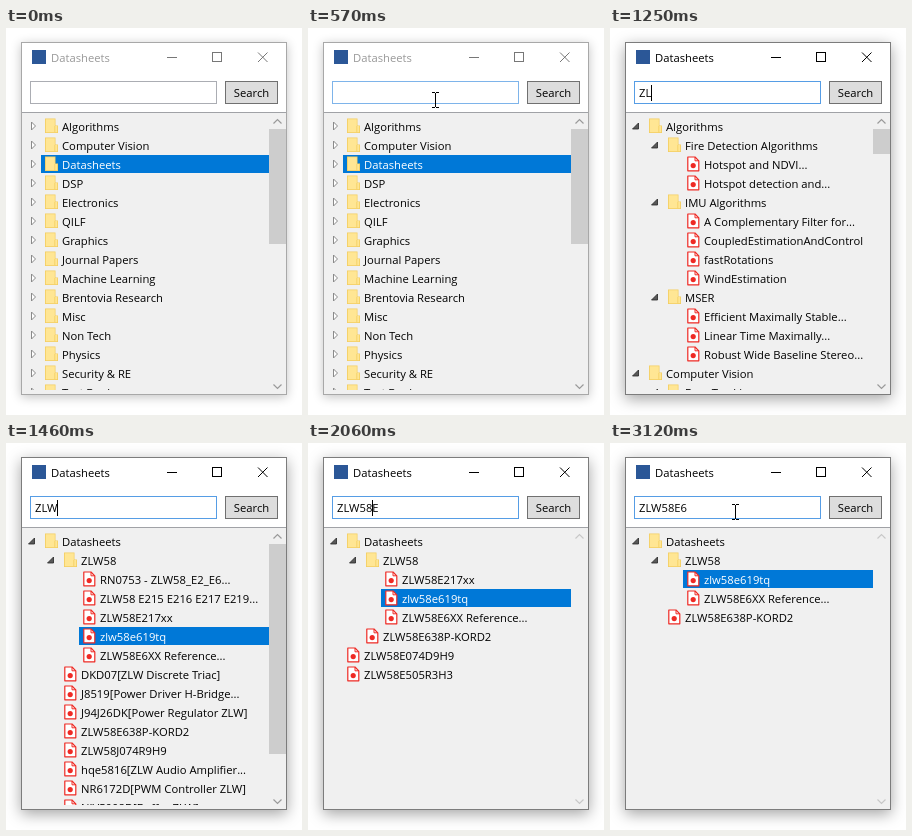
An HTML page for the animation above (3320 ms loop, 296x387 px).

```html
<!DOCTYPE html>
<html lang="en">
<head>
<meta charset="utf-8">
<title>Datasheets</title>
<style>
  html, body { margin: 0; width: 100%; height: 100%; overflow: hidden; background: #fff; }
  #win {
    position: absolute; left: 15px; top: 14px; width: 266px; height: 353px;
    box-shadow: 0 2px 10px rgba(0, 0, 0, .24);
  }
  #win.active { box-shadow: 0 4px 14px rgba(0, 0, 0, .36); }
  svg { position: absolute; left: 0; top: 0; display: block; }
  text { font: 11.25px "Open Sans", "Noto Sans", sans-serif; fill: #000; white-space: pre; }
  .crisp { shape-rendering: crispEdges; }
  .frame { fill: none; stroke: #a8a8a8; }
  .active .frame { stroke: #7c7c7c; }
  .caption { fill: #999; }
  .active .caption { fill: #000; }
  .buttons { fill: none; stroke: #777; }
  .active .buttons { stroke: #000; }
  #box { fill: #fff; stroke: #abadb3; }
  #box.hover { stroke: #7eb4ea; }
  .active #box { stroke: #569de5; }
  .sel { fill: #0078d7; }
  .sel + g text { fill: #fff; }
  .arrows { fill: none; stroke: #9a9a9a; stroke-width: 1.2; }
  .arrows.off { stroke: #c8c8c8; }
</style>
</head>
<body>
<div id="win"></div>
<svg id="stage" width="296" height="387" viewBox="0 0 296 387">
  <defs>
    <clipPath id="view"><rect x="16" y="85" width="264" height="277"/></clipPath>
    <g id="folder">
      <path d="M0 -7.5H10.5V-.5H13V7H0Z" fill="#f3cd60"/>
      <path d="M.8 -6.8H9.8V0H12.2V6.3H.8Z" fill="#ffe694"/>
      <path d="M9.8 0V6.3" stroke="#f3cd60" stroke-width=".8"/>
    </g>
    <g id="pdf">
      <path d="M.8 -7H8L11.8 -3.2V6.8H.8Z" fill="#fff" stroke="#ee2a24" stroke-width="1.2" stroke-linejoin="round"/>
      <path d="M8 -7V-3.2H11.8" fill="none" stroke="#ee2a24"/>
      <circle cx="6.2" cy="1.6" r="2.6" fill="#ee2a24"/>
    </g>
    <path id="closed" d="M.5 -4V4L4.5 0Z" fill="#fff" stroke="#8a8a8a"/>
    <path id="open" d="M3.5 -3V3H-2.5Z" fill="#595959" stroke="#262626" stroke-width=".8"/>
  </defs>

  <rect x="15" y="14" width="266" height="353" fill="#fff"/>
  <rect x="16" y="85" width="264" height="281" fill="#f0f0f0"/>
  <path class="crisp" d="M16 84.5H280" stroke="#a0a2a6"/>
  <rect class="frame crisp" x="15.5" y="14.5" width="265" height="352"/>

  <rect x="26" y="22" width="14" height="14" fill="#2b5797"/>
  <text class="caption" x="45" y="34">Datasheets</text>
  <g class="buttons">
    <path class="crisp" d="M161 29.5H171M206.5 24.5H215.5V33.5H206.5Z"/>
    <path d="M252 24.5L261.5 34M261.5 24.5L252 34"/>
  </g>

  <rect id="box" class="crisp" x="24.5" y="53.5" width="186" height="22"/>
  <text id="typed" x="29" y="69"></text>
  <path id="caret" class="crisp" d="M.5 57V73" stroke="#000"/>
  <rect class="crisp" x="219.5" y="53.5" width="52" height="22" fill="#ddd" stroke="#707070"/>
  <text x="245.5" y="69" text-anchor="middle">Search</text>

  <g id="lists" clip-path="url(#view)"></g>
  <rect id="thumb" x="263" y="101" width="17" fill="#cdcdcd"/>
  <path id="arrows" class="arrows" d="M267.5 95.5L271.5 91.5L275.5 95.5M267.5 356.5L271.5 360.5L275.5 356.5"/>

  <path id="pointer" d="M.5 .5V16L4 12.6L6.4 18L9 16.8L6.6 11.6H11.4Z" fill="#fff" stroke="#000"/>
  <path id="beam" class="crisp" d="M-3 -7.5H0M1 -7.5H4M.5 -7V7M-3 7.5H0M1 7.5H4" fill="none" stroke="#000"/>
</svg>
<script>
const LOOP = 3320, ROW = 19;
const $ = id => document.getElementById(id);

// Row: depth, optional ! for selected, kind (> closed folder, + open folder, . file), label.
const part = "ZLW58E";
const chips = [
  "0+Datasheets", "1+ZLW58",
  "2.RN0753 - ZLW58_E2_E6...", "2.ZLW58 E215 E216 E217 E219...",
  `2.${part}217xx`, "2!.zlw58e619tq", `2.${part}6XX Reference...`
];
const board = `1.${part}638P-KORD2`, lowPower = "1.ZLW58J074R9H9";
const loose = [`0.${part}074D9H9`, `0.${part}505R3H3`];

const lists = {
  all: {
    thumb: 115,
    rows: ["0>Algorithms", "0>Computer Vision", "0!>Datasheets", "0>DSP", "0>Electronics", "0>QILF",
      "0>Graphics", "0>Journal Papers", "0>Machine Learning", "0>Brentovia Research", "0>Misc",
      "0>Non Tech", "0>Physics", "0>Security & RE", "0>Text Books"]
  },
  broad: {
    thumb: 25,
    rows: ["0+Algorithms", "1+Fire Detection Algorithms", "2.Hotspot and NDVI...",
      "2.Hotspot detection and...", "1+IMU Algorithms", "2.A Complementary Filter for...",
      "2.CoupledEstimationAndControl", "2.fastRotations", "2.WindEstimation", "1+MSER",
      "2.Efficient Maximally Stable...", "2.Linear Time Maximally...",
      "2.Robust Wide Baseline Stereo...", "0+Computer Vision", "1+Face Tracking"]
  },
  maker: {
    thumb: 210,
    rows: [...chips, "1.DKD07[ZLW Discrete Triac]", "1.J8519[Power Driver H-Bridge...",
      "1.J94J26DK[Power Regulator ZLW]", board, lowPower, "1.hqe5816[ZLW Audio Amplifier...",
      "1.NR6172D[PWM Controller ZLW]", "1.NJV5008D[Buffer ZLW]"]
  },
  family: { thumb: 0, rows: [...chips, board, lowPower, ...loose] },
  series: { thumb: 0, rows: [...chips.slice(0, 2), ...chips.slice(4), board, ...loose] },
  exact: { thumb: 0, rows: [...chips.slice(0, 2), ...chips.slice(5), board] }
};

// Key time, time the caret catches up, number of letters, list shown.
const query = "ZLW58E6";
const keys = [
  [0, 0, 0, "all"], [980, 1030, 1, "broad"], [1230, 1250, 2, "broad"], [1410, 1460, 3, "maker"],
  [1660, 1660, 4, "family"], [1780, 1780, 5, "family"], [2060, 2080, 6, "series"], [2330, 2330, 7, "exact"]
];

function drawRow(row, i) {
  const [, depth, mark, kind, label] = row.match(/^(\d)(!?)([>+.])(.*)$/);
  const x = depth * ROW, y = 98 + i * ROW;
  const use = (id, dx) => `<use href="#${id}" x="${x + dx}" y="${y}"/>`;
  const arrow = kind === "." ? "" : use(kind === "+" ? "open" : "closed", 25);
  const bar = mark ? `<rect class="sel" x="${x + 35}" y="${y - 9}" width="${228 - x}" height="18"/>` : "";
  const icon = use(kind === "." ? "pdf" : "folder", 39);
  const text = `<text x="${x + 56}" y="${y + 5}">${label.replace("&", "&amp;")}</text>`;
  return `${arrow}${bar}<g>${icon}${text}</g>`;
}

for (const name in lists) {
  const g = document.createElementNS("http://www.w3.org/2000/svg", "g");
  g.innerHTML = lists[name].rows.map(drawRow).join("");
  $("lists").append(g);
  lists[name].node = g;
}

const show = (el, on) => { el.style.display = on ? "" : "none"; };
const place = (el, x, y) => el.setAttribute("transform", `translate(${x} ${y})`);

function mouse(t) {
  if (t >= 90 && t < 980) {
    const p = Math.min(1, (t - 90) / 480), e = 1 - (1 - p) ** 2;
    return { x: 232 - 105 * e, y: 342 - 270 * e };
  }
  return t >= 2770 ? { x: 125, y: 69 } : null;
}

function textWidth(n) {
  return n ? $("typed").getSubStringLength(0, n) : 0;
}

function render(t) {
  const active = t >= 620;
  $("win").classList.toggle("active", active);
  $("stage").classList.toggle("active", active);

  const at = keys.filter(k => k[0] <= t).length - 1;
  const [, settle, count, name] = keys[at];
  for (const key in lists) show(lists[key].node, key === name);
  const { thumb } = lists[name];
  $("thumb").setAttribute("height", thumb);
  $("arrows").classList.toggle("off", !thumb);

  $("typed").textContent = query.slice(0, count);
  const before = t < settle ? keys[at - 1][2] : count;
  place($("caret"), Math.round(29 + textWidth(before)), 0);
  show($("caret"), t >= 670 && t < 2800);

  const m = mouse(t);
  const inBox = !!m && m.y < 77;
  show($("pointer"), m && !inBox);
  show($("beam"), inBox);
  $("box").classList.toggle("hover", inBox);
  if (m) place($(inBox ? "beam" : "pointer"), Math.round(m.x), Math.round(m.y));
}

const start = performance.now();
function tick() {
  render((performance.now() - start) % LOOP);
  requestAnimationFrame(tick);
}
tick();
</script>
</body>
</html>
```
